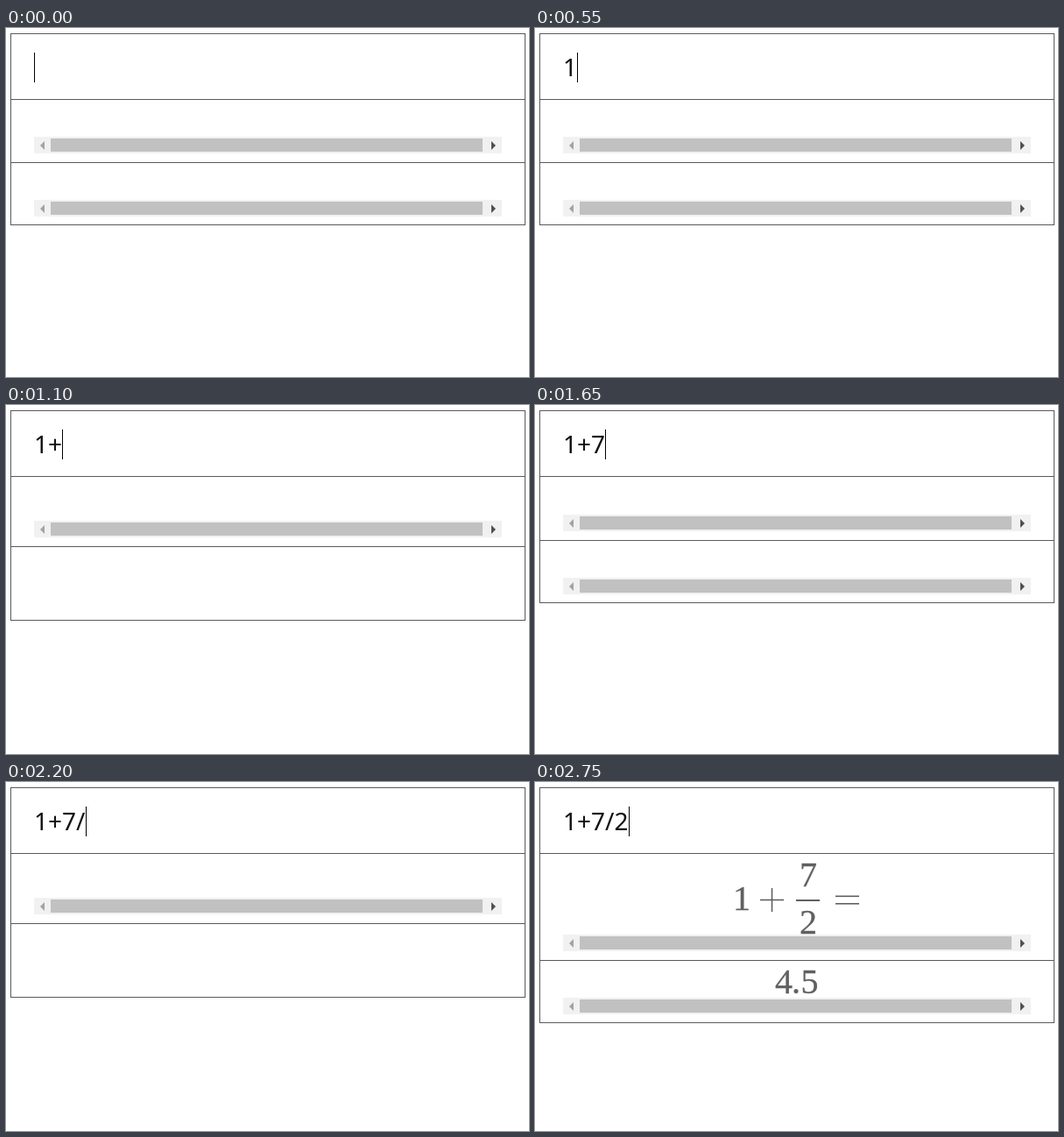
An HTML page that plays this animation: 597x398 px, repeating every 3.3 s.

```html
<!DOCTYPE html>
<html lang="en">
<head>
<meta charset="utf-8">
<title>Typed expression</title>
<style>
  html, body { margin: 0; width: 100%; height: 100%; overflow: hidden; background: #fff; }
  body, .box, .rows, .bar, .input, svg { position: absolute; }
  body { left: 0; top: 0; }
  .box, .rows, .input, .result, .second { animation: 3300ms step-end infinite; }

  .box {
    left: 5px; top: 6px; width: 588px; height: 219px;
    box-sizing: border-box; border: 1px solid #5a5a5a;
    animation-name: grow;
  }
  .input {
    left: 32px; top: 28px; width: 0; height: 34px;
    border-right: 1px solid #000; overflow: hidden; white-space: pre;
    font: 28px/32px "Noto Sans", "Open Sans", sans-serif; color: #111;
    animation-name: type;
  }
  .line { position: absolute; left: 6px; width: 586px; height: 1px; background: #5a5a5a; }
  .rows { left: 0; top: 0; width: 597px; animation-name: shift; }
  .bar { left: 32px; top: 124px; width: 534px; height: 19px; background: #f1f1f1; }
  .bar i { position: absolute; left: 19px; top: 2px; width: 493px; height: 15px; background: #c1c1c1; }
  .bar::before, .bar::after {
    content: ""; position: absolute; top: 4.5px;
    border: 5px solid transparent;
  }
  .bar::before { left: 2px; border-right-color: #a3a3a3; }
  .bar::after { left: 522px; border-left-color: #505050; }
  .second { top: 196px; animation-name: blink; }
  .result { left: 0; top: 0; animation-name: reveal; }
  .result text { font: 40px "Liberation Serif", serif; fill: #606060; stroke: #606060; stroke-width: .3px; }
  .result rect { fill: #606060; }

  @keyframes type {
    0% { width: 0; }
    16.66% { width: 16px; }
    33.33% { width: 32px; }
    50% { width: 48px; }
    66.66% { width: 59px; }
    83.33%, 100% { width: 75px; }
  }
  @keyframes grow {
    0% { height: 219px; }
    33.33% { height: 240px; }
    50% { height: 220px; }
    66.66% { height: 240px; }
    83.33%, 100% { height: 269px; }
  }
  @keyframes shift {
    0% { transform: translateY(0); }
    33.33% { transform: translateY(8px); }
    50% { transform: translateY(1px); }
    66.66% { transform: translateY(8px); }
    83.33%, 100% { transform: translateY(50px); }
  }
  @keyframes blink {
    0% { visibility: visible; }
    33.33% { visibility: hidden; }
    50% { visibility: visible; }
    66.66% { visibility: hidden; }
    83.33%, 100% { visibility: visible; }
  }
  @keyframes reveal {
    0% { visibility: hidden; }
    83.33%, 100% { visibility: visible; }
  }
</style>
</head>
<body>
  <div class="box"></div>
  <div class="input">1+7/2</div>
  <div class="line" style="top:81px"></div>
  <div class="rows">
    <div class="bar"><i></i></div>
    <div class="line" style="top:153px"></div>
    <div class="bar second"><i></i></div>
  </div>
  <svg class="result" width="597" height="398">
    <g text-anchor="middle">
      <text x="236" y="146">1</text>
      <text x="312" y="119">7</text>
      <text x="312" y="173">2</text>
    </g>
    <text x="274 293 303.5" y="241">4.5</text>
    <rect x="257" y="133.7" width="27" height="1.6"/>
    <rect x="269.7" y="121" width="1.6" height="27"/>
    <rect x="298" y="134" width="27" height="2"/>
    <rect x="343" y="129.5" width="27" height="1.6"/>
    <rect x="343" y="138" width="27" height="1.6"/>
  </svg>
</body>
</html>
```
